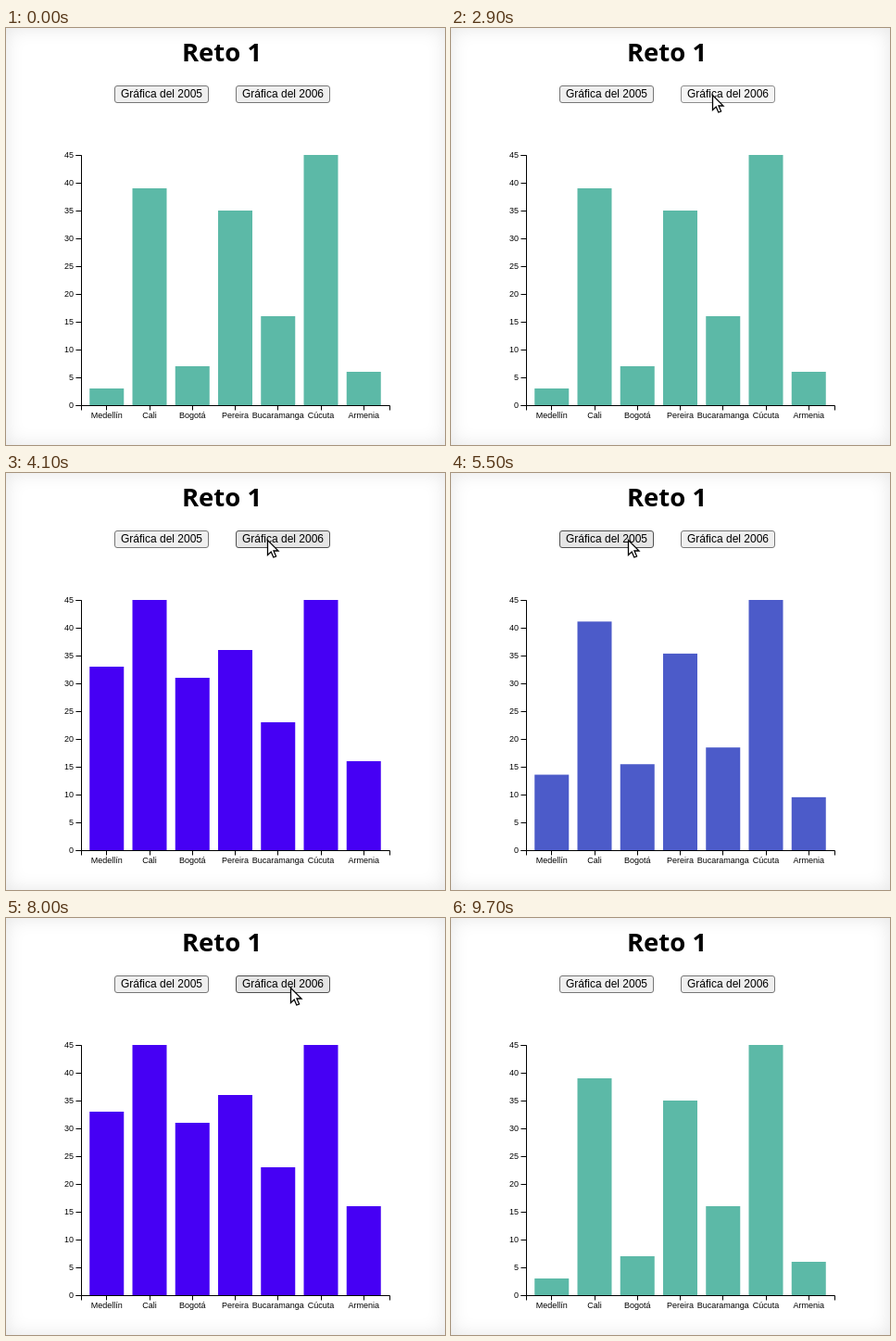
These frames come from a looping animation (474x450 px, 10 s). An HTML page:

```html
<!DOCTYPE html>
<html lang="es">
<head>
<meta charset="utf-8">
<style>
  html, body { margin: 0; width: 100%; height: 100%; overflow: hidden; background: #fff; }
  body { position: relative; }
  svg { display: block; position: absolute; left: 0; top: 0; }
  body::after { content: ""; position: absolute; inset: 0; box-shadow: inset 0 0 20px rgba(0, 0, 0, .1); }
  text { font: 9px "Liberation Sans", Arial, sans-serif; text-anchor: middle; }
  .title { font: bold 27.5px "Noto Sans", "Open Sans", sans-serif; }
  .label { font-size: 12px; }
  .value { text-anchor: end; }
  .axis { fill: none; stroke: #000; }
</style>
</head>
<body>
<svg width="474" height="450">
  <text class="title" x="233" y="36">Reto 1</text>
  <g id="buttons"></g>
  <g id="bars"></g>
  <g id="axes"></g>
  <path id="cursor" d="M.5 .5V16.5L4.2 13L6.8 19L9.6 17.8L7 12H12Z" fill="#fff" stroke="#000" stroke-width="1.3"/>
</svg>
<script>
const LOOP = 10000, STEP = 100, GROW = 1000, BASE = 407, UNIT = 6;
const cities = ["Medellín", "Cali", "Bogotá", "Pereira", "Bucaramanga", "Cúcuta", "Armenia"];
const data = {
  2005: [3, 39, 7, 35, 16, 45, 6],
  2006: [33, 45, 31, 36, 23, 45, 16]
};
const teal = [92, 185, 167], purple = [70, 0, 244];

// Clicks: time the button is pressed, time the bars start, year chosen
const clicks = [[2900, 2900, 2006], [4900, 4945, 2005], [6700, 6767, 2006], [8600, 8650, 2005]];

// Colour stops against the time since the click
const fades = {
  2005: [[0, ...purple], [350, ...purple], [450, 72, 0, 224], [555, 76, 91, 201], [900, ...teal]],
  2006: [[0, ...teal], [1000, ...teal], [1200, ...purple]]
};

// Pointer path: time, x, y
const path = [
  [1600, 393, 180], [1900, 240, 18], [2200, 240, 18], [2800, 282, 72],
  [4400, 282, 72], [4800, 191, 72], [6000, 191, 72], [6300, 285, 81],
  [6500, 307, 75], [8100, 307, 75], [8500, 195, 72], [8700, 195, 72], [9000, 130, 150]
];

const $ = id => document.getElementById(id);

function add(parent, tag, attrs, text = "") {
  const node = document.createElementNS("http://www.w3.org/2000/svg", tag);
  for (const key in attrs) node.setAttribute(key, attrs[key]);
  node.textContent = text;
  return parent.appendChild(node);
}

function along(stops, t) {
  const next = stops.findIndex(s => s[0] > t);
  if (next < 0) return stops[stops.length - 1].slice(1);
  if (next === 0) return stops[0].slice(1);
  const a = stops[next - 1], b = stops[next];
  const k = (t - a[0]) / (b[0] - a[0]);
  return a.slice(1).map((v, i) => v + (b[i + 1] - v) * k);
}

const cubicInOut = p => p < .5 ? 4 * p ** 3 : 1 - 4 * (1 - p) ** 3;

const buttons = [[117, 2005], [248, 2006]].map(([x, year]) => {
  const box = add($("buttons"), "rect", { x: x + .5, y: 62.5, width: 101, height: 18, rx: 2.5 });
  add($("buttons"), "text", { class: "label", x: x + 51, y: 75 }, "Gráfica del " + year);
  return { x, year, box };
});

const bars = cities.map((city, i) => {
  const x = 90.25 + 46.25 * i, mid = x + 18.5;
  add($("axes"), "path", { class: "axis", d: `M${Math.floor(mid) + .5} 407.5v5` });
  add($("axes"), "text", { x: mid, y: 421 }, city);
  return add($("bars"), "rect", { x, width: 37 });
});

add($("axes"), "path", { class: "axis", d: "M75.5 137.5h6v270h-6M81.5 412.5v-5h333v5" });
for (let v = 0; v <= 45; v += 5) {
  const y = BASE + .5 - v * UNIT;
  add($("axes"), "path", { class: "axis", d: `M75.5 ${y}h6` });
  add($("axes"), "text", { class: "value", x: 73, y: y + 2.7 }, v);
}

function drawBars(t) {
  const click = clicks.filter(c => c[1] <= t).pop() || [0, -LOOP, 2005];
  const age = t - click[1], year = click[2];
  const k = cubicInOut(Math.min(1, age / GROW));
  const fill = `rgb(${along(fades[year], age).map(Math.round)})`;
  bars.forEach((bar, i) => {
    const from = data[4011 - year][i], to = data[year][i];
    const height = (from + (to - from) * k) * UNIT;
    bar.setAttribute("y", BASE - height);
    bar.setAttribute("height", height);
    bar.setAttribute("fill", fill);
  });
}

function drawPointer(t) {
  const [x, y] = along(path, t);
  const shown = t >= 1600 && t < 9000;
  $("cursor").setAttribute("transform", `translate(${x} ${y})`);
  $("cursor").setAttribute("visibility", shown ? "visible" : "hidden");
  for (const b of buttons) {
    const over = shown && x >= b.x && x < b.x + 102 && y >= 62 && y < 81;
    const down = over && clicks.some(c => c[0] === t && c[2] === b.year);
    const [fill, stroke] = down ? ["#f5f5f5", "#8d8d8d"] : over ? ["#e5e5e5", "#4f4f4f"] : ["#efefef", "#767676"];
    b.box.setAttribute("fill", fill);
    b.box.setAttribute("stroke", stroke);
  }
}

const start = performance.now();
function frame() {
  const t = Math.floor((performance.now() - start) % LOOP / STEP) * STEP;
  drawBars(t);
  drawPointer(t);
  requestAnimationFrame(frame);
}
frame();
</script>
</body>
</html>
```
